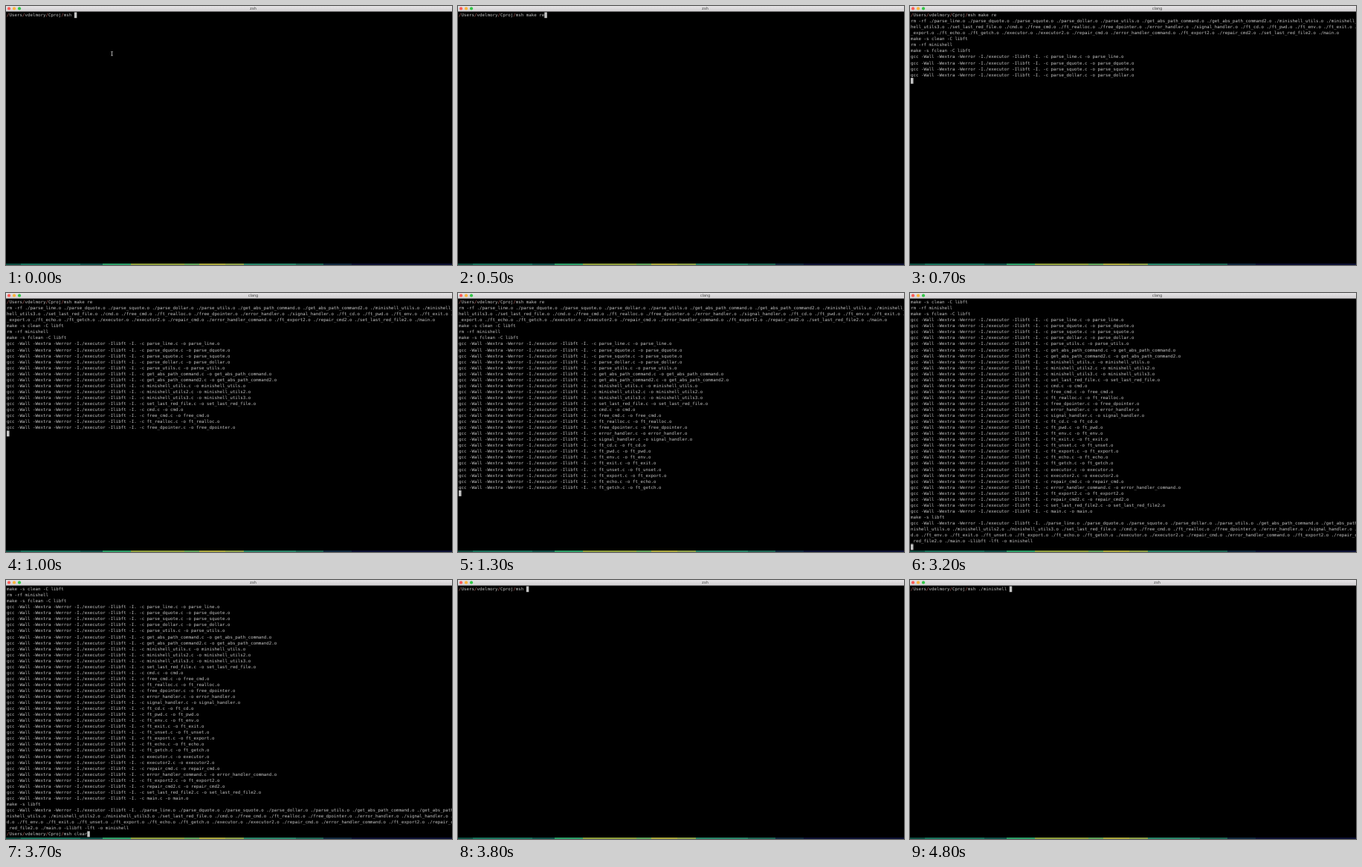
Write an HTML page with a canvas that moves like this. It is 600 px wide and 349 px high and loops after 5000 ms.

```html
<!DOCTYPE html>
<html lang="en">
<head>
<meta charset="utf-8">
<title>Terminal build</title>
<style>
  html, body { margin: 0; width: 100%; height: 100%; overflow: hidden; background: #000; }
  canvas { display: block; }
</style>
</head>
<body>
<canvas id="stage" width="600" height="349"></canvas>
<script>
const ctx = document.getElementById("stage").getContext("2d");

const LOOP = 5000, STEP = 100;
const COLUMNS = 188, ROWS = 42;
const CELL = 3.494, LINE = 8.05, LEFT = 1, TOP = 8.2;
const TEXT = "#c4c4c4", SLASH = "#c8706c";

const PROMPT = "/Users/vdelmory/Cproj/msh ";
const FLAGS = "gcc -Wall -Wextra -Werror -I./executor -Ilibft -I. ";
const files = ("parse_line parse_dquote parse_squote parse_dollar parse_utils " +
  "get_abs_path_command get_abs_path_command2 minishell_utils minishell_utils2 minishell_utils3 " +
  "set_last_red_file cmd free_cmd ft_realloc free_dpointer error_handler signal_handler " +
  "ft_cd ft_pwd ft_env ft_exit ft_unset ft_export ft_echo ft_getch executor executor2 " +
  "repair_cmd error_handler_command ft_export2 repair_cmd2 set_last_red_file2 main").split(" ");
const objects = files.map(name => `./${name}.o`).join(" ");

// Text typed at the prompt, keyed by the step at which it appears.
const makeKeys = { 0: "", 1: "m", 2: "ma", 3: "make", 4: "make r", 5: "make re" };
const clearKeys = { 33: "", 34: "c", 35: "cl", 36: "clea", 37: "clear" };
const runKeys = { 38: "", 41: ".", 42: "./", 44: "./mi", 45: "./mini", 48: "./minishell " };

function typed(keys, step) {
  const last = Object.keys(keys).filter(key => +key <= step).pop();
  return PROMPT + keys[last];
}

function wrap(line) {
  return line.match(new RegExp(`.{1,${COLUMNS}}`, "g")) || [""];
}

function terminalLines(step) {
  if (step >= 38) return [typed(runKeys, step)];
  const lines = [typed(makeKeys, step)];
  if (step < 6) return lines;

  lines.push("rm -rf " + objects, "make -s clean -C libft", "rm -rf minishell", "make -s fclean -C libft");
  const compiled = Math.floor(1 + 3.5 * (step - 6));
  for (const name of files.slice(0, compiled)) lines.push(`${FLAGS}-c ${name}.c -o ${name}.o`);
  if (step >= 17) lines.push("make -s libft");
  if (step >= 32) lines.push(`${FLAGS}${objects} -Llibft -lft -o minishell`);
  lines.push(step >= 33 ? typed(clearKeys, step) : "");
  return lines.flatMap(wrap);
}

// Drawing large and scaling down keeps fractional character widths.
function drawText(text, x, y, size, family, color, align = "left") {
  ctx.save();
  ctx.translate(x, y);
  ctx.scale(0.1, 0.1);
  ctx.font = `${size * 10}px ${family}`;
  ctx.textAlign = align;
  ctx.fillStyle = color;
  ctx.fillText(text, 0, 0);
  ctx.restore();
}

function drawLine(text, row) {
  const put = (part, color) =>
    drawText(part, LEFT, TOP + row * LINE + 5.9, CELL / 0.60205, '"DejaVu Sans Mono", monospace', color);
  if (!text.startsWith(PROMPT)) return put(text, TEXT);
  const path = PROMPT.trimEnd();
  put(path.replace(/\//g, " ") + text.slice(path.length), TEXT);
  put(path.replace(/[^/]/g, " "), SLASH);
}

function drawTitleBar(title) {
  const shade = ctx.createLinearGradient(0, 0, 0, 7.5);
  shade.addColorStop(0, "#e6e4e6");
  shade.addColorStop(1, "#cfcdcf");
  ctx.fillStyle = shade;
  ctx.fillRect(0, 0, 600, 7.5);
  ["#fc5b57", "#fdb43a", "#33c748"].forEach((color, i) => {
    ctx.fillStyle = color;
    ctx.beginPath();
    ctx.arc(4 + 7 * i, 3.4, 2.1, 0, Math.PI * 2);
    ctx.fill();
  });
  drawText(title, 332.5, 5.2, 5.3, "Inter, sans-serif", "#444", "center");
}

function drawDesktopEdge() {
  const bands = [
    [0, "#0d4c40"], [20, "#17705a"], [100, "#0f5048"], [130, "#2a9d66"], [168, "#8c9c3a"],
    [240, "#5fa056"], [260, "#a8a63c"], [295, "#8a9e46"], [320, "#278468"], [390, "#1b6453"],
    [427, "#10283f"], [465, "#0c1034"]
  ];
  bands.forEach(([x, color], i) => {
    const end = i + 1 < bands.length ? bands[i + 1][0] : 600;
    ctx.fillStyle = color;
    ctx.fillRect(x, 347, end - x, 2);
  });
}

function drawPointer() {
  ctx.fillStyle = "#aaa";
  ctx.fillRect(142, 62, 1, 5);
  ctx.fillRect(141, 61, 3, 0.7);
  ctx.fillRect(141, 66.5, 3, 0.7);
}

function draw(step) {
  ctx.fillStyle = "#000";
  ctx.fillRect(0, 0, 600, 349);
  ctx.fontKerning = "none";
  ctx.textRendering = "geometricPrecision";

  const lines = terminalLines(step).slice(-ROWS);
  lines.forEach(drawLine);
  const row = lines.length - 1;
  ctx.fillStyle = "#c4c4c4";
  ctx.fillRect(LEFT + lines[row].length * CELL, TOP + row * LINE + 0.2, CELL, 7.8);

  drawTitleBar(step >= 7 && step < 33 ? "clang" : "zsh");
  drawDesktopEdge();
  if (step === 0) drawPointer();
}

const start = performance.now();
function tick() {
  draw(Math.floor((performance.now() - start) % LOOP / STEP));
  requestAnimationFrame(tick);
}
tick();
</script>
</body>
</html>
```
